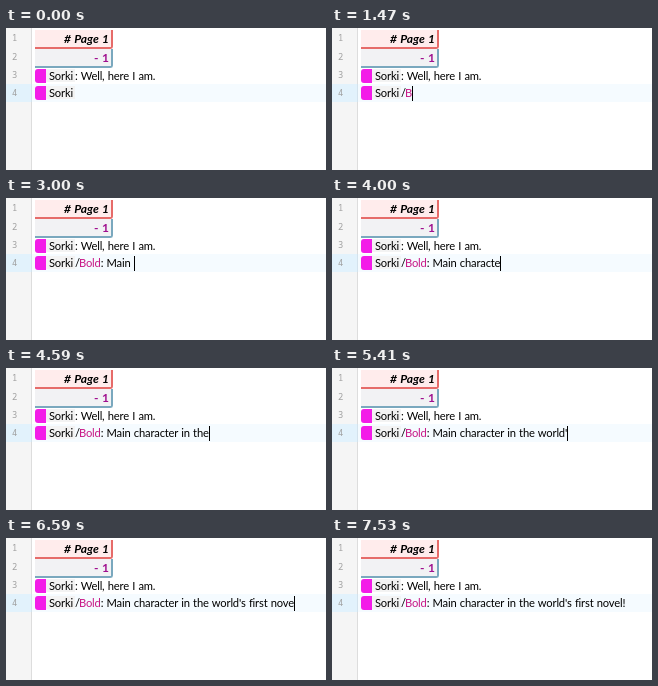
These frames come from a looping animation (320 by 142 pixels, 8.06 s). An HTML page:

```html
<!DOCTYPE html>
<html lang="en">
<head>
<meta charset="utf-8">
<title>Script editor</title>
<style>
  html, body { margin: 0; width: 100%; height: 100%; overflow: hidden; background: #fff; }
  #editor {
    position: relative; width: 320px; height: 142px; overflow: hidden; background: #fff;
    font: 11.2px/18px Lato, "Open Sans", sans-serif;
    letter-spacing: -.18px; word-spacing: .6px; color: #000; white-space: pre;
  }
  #editor > * { position: absolute; box-sizing: border-box; }
  .gutter { left: 0; top: 0; width: 26px; height: 142px; background: #f5f5f5; border-right: 1px solid #ddd; }
  .active { left: 0; top: 56px; width: 320px; height: 18px; background: #f5fbff; }
  .active::before {
    content: ""; position: absolute; width: 26px; height: 18px; box-sizing: border-box;
    background: #e2f2fc; border-right: 1px solid #d3e2ec;
  }
  .num { left: 6px; font: 8.8px/18px "Noto Sans Mono", monospace; letter-spacing: 0; color: #a0a0a0; }
  .head {
    left: 29px; width: 78px; height: 19px; padding-right: 2px; text-align: right;
    font-weight: 700; font-size: 12px; letter-spacing: 0; border: solid; border-width: 0 2px 2px 0;
    border-radius: 0 0 3px 0;
  }
  .page { top: 2px; font-style: italic; background: #ffecec; border-color: #e66b69; }
  .panel { top: 21px; line-height: 17px; color: #a0108f; background: #f2f2f4; border-color: #7aa8be; }
  .line { left: 40px; height: 18px; }
  .line::before {
    content: ""; position: absolute; left: -11px; top: 2px; width: 11px; height: 14px;
    background: #f31ce8; border-radius: 3px 0 0 3px;
  }
  .name { padding: 0 2px 0 3px; background: #f3f3f3; }
  #slash { letter-spacing: -1px; }
  #style { color: #c71585; }
  #caret { position: relative; }
  #caret::after { content: ""; position: absolute; left: 0; top: 0; width: 1px; height: 15px; background: #000; }
  #caret.off { visibility: hidden; }
</style>
</head>
<body>
<div id="editor">
  <div class="gutter"></div>
  <div class="active"></div>
  <div class="num" style="top:1px">1</div>
  <div class="num" style="top:19.5px">2</div>
  <div class="num" style="top:38px">3</div>
  <div class="num" style="top:55.5px">4</div>
  <div class="head page"># Page 1</div>
  <div class="head panel">- 1</div>
  <div class="line" style="top:39px"><span class="name">Sorki</span>: Well, here I am.</div>
  <div class="line" style="top:56px"><span class="name">Sorki</span><span id="slash"></span><span id="style"></span><span id="speech"></span><span id="caret"></span></div>
</div>
<script>
  const LOOP = 8060;
  const TICK = 58.8;

  // Each word is typed at an even pace; start and pace are in ticks.
  const WORDS = [
    { text: "/", start: 17, pace: 1 },
    { text: "Bold: ", start: 25, pace: 2.4 },
    { text: "Main ", start: 43, pace: 2 },
    { text: "character ", start: 54, pace: 1.9 },
    { text: "in the ", start: 72, pace: 1.16 },
    { text: "world's ", start: 81, pace: 2 },
    { text: "first ", start: 96, pace: 1.6 },
    { text: "novel", start: 106, pace: 2 },
    { text: "!", start: 118, pace: 1 }
  ];
  const [slash, style, speech, caret] =
    ["slash", "style", "speech", "caret"].map(id => document.getElementById(id));

  const typedPart = ({ text, start, pace }, tick) =>
    tick < start ? "" : text.slice(0, Math.floor((tick - start) / pace) + 1);

  const caretOn = tick => (tick >= 1 && tick < 11) || (tick >= 17 && tick < 128);

  function draw(t) {
    const tick = Math.floor(t / TICK);
    const typed = WORDS.map(word => typedPart(word, tick)).join("");
    slash.textContent = typed.slice(0, 1);
    style.textContent = typed.slice(1, 5);
    speech.textContent = typed.slice(5);
    caret.style.left = typed ? "0" : "-2px";
    caret.classList.toggle("off", !caretOn(tick));
  }

  const start = performance.now();
  function loop() {
    draw((performance.now() - start) % LOOP);
    requestAnimationFrame(loop);
  }
  loop();
</script>
</body>
</html>
```
